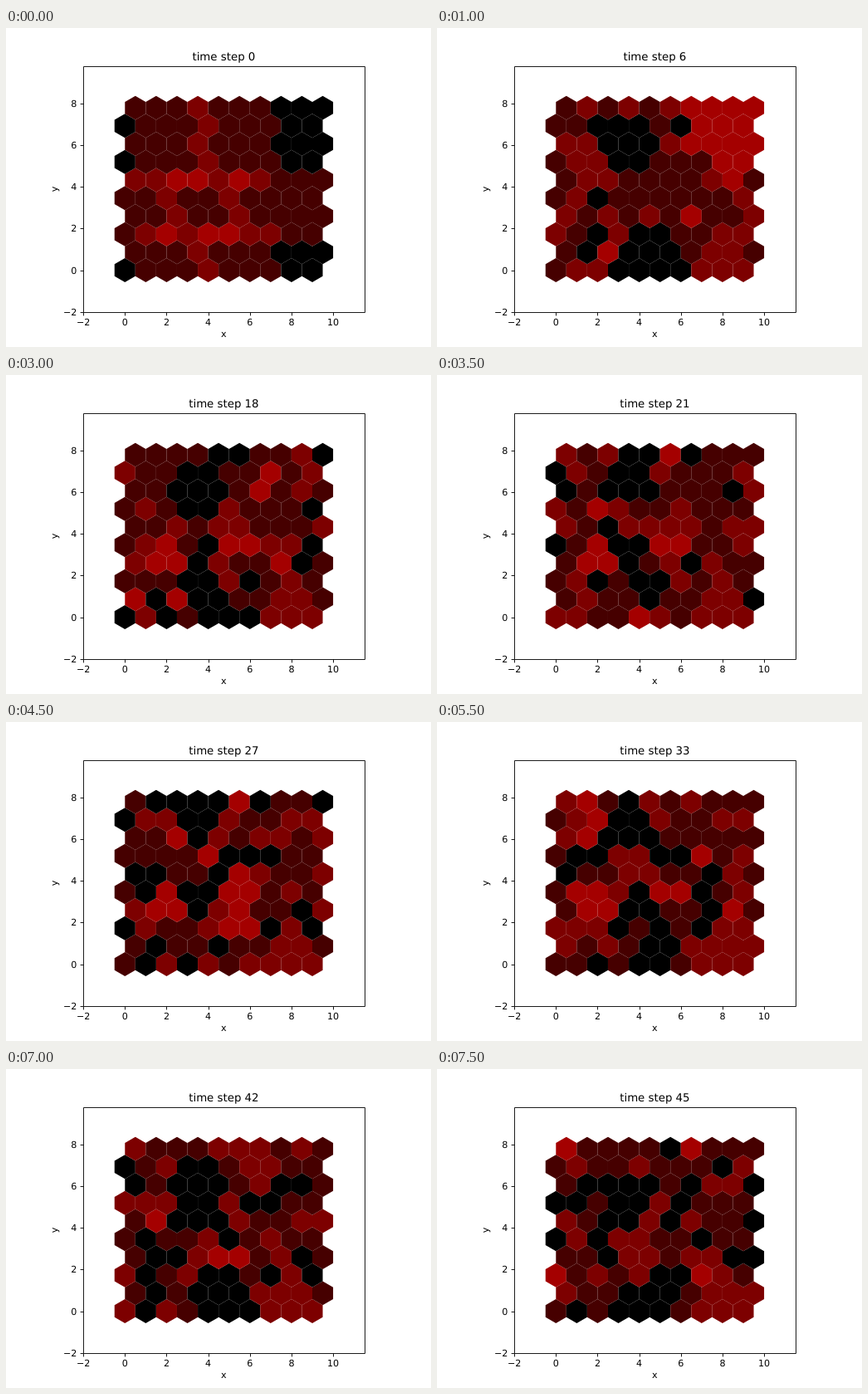
An HTML page for the animation above (8 s loop, 512 px wide and 384 px high).

```html
<!DOCTYPE html>
<html lang="en">
<head>
<meta charset="utf-8">
<title>Hexagonal lattice</title>
<style>
  html, body { margin: 0; width: 100%; height: 100%; overflow: hidden; background: #fff; }
  svg { display: block; width: 512px; height: 384px; }
  text { font: 11.11px "DejaVu Sans", sans-serif; text-anchor: middle; text-rendering: geometricPrecision; }
  text.title { font-size: 13.33px; }
  text.left { text-anchor: end; }
</style>
</head>
<body>
<svg viewBox="0 0 512 384"></svg>
<script>
const svg = document.querySelector('svg');
const SIZE = 10, UNIT = 25.08, ROW = Math.sqrt(3) / 2;
const TICK_MS = 500, TICKS = 16, STEPS_PER_TICK = 3;
const COLORS = ['#000', '#460000', '#7d0000', '#a40000'];

const px = x => 143.28 + x * UNIT;
const py = y => 291.6 - y * UNIT;
const snap = v => Math.round(v) + 0.5;
const wave = (tick, peak, period) => Math.cos(2 * Math.PI * (tick - peak) / period);

function add(tag, attrs, text = '') {
  const node = document.createElementNS('http://www.w3.org/2000/svg', tag);
  for (const key in attrs) node.setAttribute(key, attrs[key]);
  node.textContent = text;
  return svg.appendChild(node);
}

function random(seed, row, col) {
  let h = Math.imul(seed + 1, 374761393) ^ Math.imul(row + 1, 668265263) ^ Math.imul(col + 1, 1274126177);
  h = Math.imul(h ^ (h >>> 15), 2246822519);
  h = Math.imul(h ^ (h >>> 13), 3266489917);
  return ((h ^ (h >>> 16)) >>> 0) / 2 ** 32;
}

// Two horizontal strands joined by posts, with empty corners.
function startLevel({ row, col, x }) {
  const inner = row >= 2 && row <= 5;
  if (!inner && (x < 0.5 || x >= 7.5)) return 0;
  const strand = (row === 2 && col >= 1 && col <= 7) || (row === 5 && col <= 6);
  const outerPost = (row <= 2 || row >= 5) && Math.abs(x - 3.75) < 0.3;
  const innerPost = inner && (col === 2 || col === 5);
  return 1 + strand + (outerPost || innerPost);
}

// Slowly moving voids and dense spots over random noise.
function flowLevel(tick, { row, col, x, y }) {
  const near = (cx, cy, radius) => Math.hypot(x - cx, y - cy) <= radius;

  if (tick < 6 && near(8.4, 7.2, 2.3)) return Math.round(1.5 - 1.5 * wave(tick, 0, 4));
  if (near(3.5, 6.4 + 1.2 * wave(tick, 9, 10), 1.4)) return 0;
  if (near(4.6, 0.4, 1 + 0.6 * wave(tick, 2.5, 11))) return 0;
  if (tick > 5 && tick < 14 && near(3.9, 3.1, 0.75)) return 0;
  if (tick > 3 && tick < 14 && (near(5.5, 3.4, 0.6) || near(2, 2.9, 0.75))) return 3;
  if (near(8, 0.7, 1.3)) return 2;

  const n = random(tick, row, col);
  return n < 0.2 ? 0 : n < 0.68 ? 1 : n < 0.95 ? 2 : 3;
}

const levelAt = (tick, cell) => tick === 0 ? startLevel(cell) : flowLevel(tick, cell);

function hexagon(x, y) {
  const radius = UNIT / Math.sqrt(3);
  return Array.from({ length: 6 }, (_, i) => {
    const a = Math.PI * (i / 3 + 1 / 6);
    return `${(px(x) + radius * Math.cos(a)).toFixed(2)},${(py(y) + radius * Math.sin(a)).toFixed(2)}`;
  }).join(' ');
}

const cells = [];
for (let row = 0; row < SIZE; row++) {
  for (let col = 0; col < SIZE; col++) {
    const x = col + (row % 2) / 2, y = row * ROW;
    cells.push({ row, col, x, y, node: add('polygon', { points: hexagon(x, y) }) });
  }
}

const line = d => add('path', { d, fill: 'none', stroke: '#000', 'stroke-width': 0.89 });
const label = v => String(v).replace('-', '\u2212');

line('M93.5 46.5H432.5V342.5H93.5Z');
for (let v = -2; v <= 10; v += 2) {
  line(`M${snap(px(v))} 342.5v3.9`);
  add('text', { x: px(v), y: 358 }, label(v));
  if (v > 8) continue;
  line(`M93.5 ${snap(py(v))}h-3.9`);
  add('text', { x: 85.3, y: Math.round(py(v) + 4), class: 'left' }, label(v));
}
add('text', { x: 262.4, y: 372 }, 'x');
add('text', { transform: 'translate(62 194) rotate(-90)' }, 'y');
const title = add('text', { x: 262.4, y: 39, class: 'title' });

let shown = -1;
function draw(time) {
  const tick = Math.floor(time / TICK_MS) % TICKS;
  if (tick === shown) return;
  shown = tick;
  title.textContent = `time step ${tick * STEPS_PER_TICK}`;
  for (const cell of cells) cell.node.setAttribute('fill', COLORS[levelAt(tick, cell)]);
}

const start = performance.now();
function loop() {
  draw(performance.now() - start);
  requestAnimationFrame(loop);
}
loop();
</script>
</body>
</html>
```
